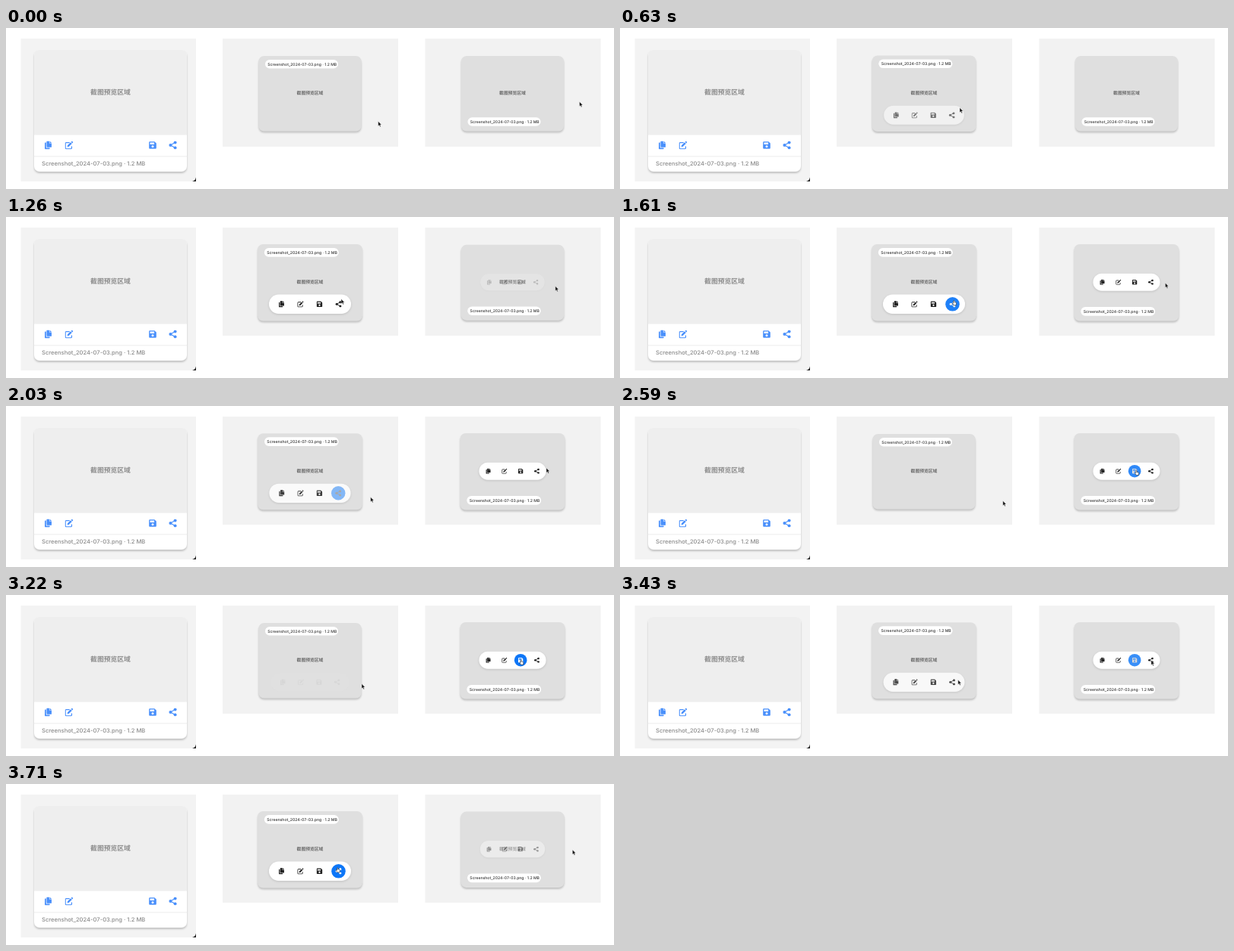
Recreate the animation shown at these times as an HTML page. Size 800 px wide and 213 px high, loop 3780 ms.

```html
<!DOCTYPE html>
<html lang="zh">
<head>
<meta charset="utf-8">
<style>
html, body { margin: 0; width: 100%; height: 100%; overflow: hidden; background: #fff; }
svg { display: block; width: 800px; height: 213px; }
text { font-family: Inter, "Noto Sans CJK SC", "Noto Sans CJK", sans-serif; font-weight: 500; text-rendering: geometricPrecision; }
.title { text-anchor: middle; font-weight: 700; }
.lift { filter: drop-shadow(0 2px 1.2px #0003); }
.soft { filter: drop-shadow(0 1px 1.5px #0002); }
</style>
</head>
<body>
<svg viewBox="0 0 800 213">
  <defs>
    <symbol id="copy" viewBox="0 0 16 16">
      <path fill="currentColor" d="M6 0h4v4.500h4.500V12H6q-1 0-1-1V1q0-1 1-1zM11 0l3.500 3.500H11zM2.500 3H4v10h7v2q0 1-1 1H2.500q-1 0-1-1V4q0-1 1-1z"/>
    </symbol>
    <symbol id="edit" viewBox="0 0 16 16">
      <path fill="none" stroke="currentColor" stroke-width="1.800" d="M9 3H2.500Q1 3 1 4.500v9Q1 15 2.500 15h9q1.500 0 1.500-1.500V10"/>
      <path fill="currentColor" d="M5 8.500l6-6L13.500 5l-6 6L4.500 11.500zM11.800 1.700l1-1q.7-.6 1.400 0l1.100 1.100q.6.7 0 1.400l-1 1z"/>
    </symbol>
    <symbol id="save" viewBox="0 0 16 16">
      <path fill="currentColor" fill-rule="evenodd" d="M2.500 1H11.500L15 4.500v9q0 1.500-1.500 1.500h-11Q1 15 1 13.500v-11Q1 1 2.500 1zM3 3v3.500h8V3zM8 8.500a2.200 2.200 0 1 0 .01 0z"/>
    </symbol>
    <symbol id="share" viewBox="0 0 16 16">
      <path fill="none" stroke="currentColor" stroke-width="1.800" d="M12.500 3l-9 5 9 5"/>
      <g fill="currentColor"><circle cx="12.500" cy="3" r="2.900"/><circle cx="3.500" cy="8" r="2.900"/><circle cx="12.500" cy="13" r="2.900"/></g>
    </symbol>
    <path id="arrow" fill="#111" stroke="#fff" stroke-width=".4" d="M0 0v6.300l1.400-1.300 1 2.300 1.100-.5-1-2.200h1.900z"/>
    <path id="hand" fill="#fff" stroke="#222" stroke-width=".6" stroke-linejoin="round" d="M-.6 3.600V.5q.6-1 1.200 0v1.700l2.100.5q.6.200.5 1L2.800 6.400H0L-1.800 4.200q.2-1 1.200-.6z"/>
  </defs>
</svg>
<script>
const LOOP = 3780, STEP = 70, FADE = 280, SAMPLES = 28;
const FILE = 'Screenshot_2024-07-03.png · 1.2 MB', TITLE = '截图预览区域';
const ICONS = ['copy', 'edit', 'save', 'share'];
const svg = document.querySelector('svg');

function add(parent, tag, attrs, text) {
  const el = document.createElementNS('http://www.w3.org/2000/svg', tag);
  for (const k in attrs) el.setAttribute(k, attrs[k]);
  if (text) el.textContent = text;
  parent.append(el);
  return el;
}
const rect = (p, x, y, width, height, rx, fill, cls = '') =>
  add(p, 'rect', { x, y, width, height, rx, fill, class: cls });
const icon = (p, name, x, y, s, color) =>
  add(p, 'use', { href: '#' + name, x: x - s / 2, y: y - s / 2, width: s, height: s, color });
const label = (p, x, y, size, fill) => add(p, 'text', { x, y, 'font-size': size, fill }, FILE);
const title = (p, x, y, size, fill) =>
  add(p, 'text', { x, y, 'font-size': size, fill, class: 'title' }, TITLE);

function staticCard() {
  rect(svg, 19.5, 14, 230.5, 189, 0, '#f3f3f3');
  rect(svg, 37, 29, 201, 161, 7, '#fff', 'lift');
  add(svg, 'path', { d: 'M37 141.500V36q0-7 7-7h187q7 0 7 7v105.500z', fill: '#eee' });
  rect(svg, 37, 169.5, 201, 0.8, 0, '#e8e8e8');
  title(svg, 137.5, 88.2, 8.8, '#8c8c8c');
  [55.5, 83, 193, 219.5].forEach((x, i) => icon(svg, ICONS[i], x, 155, 11, '#4a90fb'));
  label(svg, 47, 182.3, 7.6, '#8c8c8c');
  add(svg, 'path', { d: 'M250 197.500v5.500h-5q4-1 5-5.500z', fill: '#222' });
}

// Position on a polyline of [time, x, y] points.
function along(path, t) {
  const i = Math.max(1, path.findIndex(p => p[0] > t));
  const [t0, x0, y0] = path[i - 1], [t1, x1, y1] = path[i];
  const u = Math.max(0, (t - t0) / (t1 - t0));
  return [x0 + (x1 - x0) * u, y0 + (y1 - y0) * u];
}

// Fade level: share of the last FADE ms in which the test held.
function level(test, t) {
  let hits = 0;
  for (let k = 0; k < SAMPLES; k++) hits += test(t - k * FADE / SAMPLES);
  return hits / SAMPLES;
}

function hoverCard({ x, pillY, hot, bar, path }) {
  const mid = x + 115, hotX = bar.x + (hot - 1.5) * bar.gap;
  rect(svg, x, 14, 231, 143, 0, '#f2f2f2');
  const card = add(svg, 'g');
  rect(card, mid - 67.5, 37, 135, 99.5, 7, '#dfdfdf', 'lift');
  rect(card, x + 56, pillY, 96, 11.5, 5.75, '#fff');
  label(card, x + 59.3, pillY + 7.6, 5.07, '#333');
  title(svg, mid, 88.2, 5.8, '#666');

  const tools = add(svg, 'g');
  rect(tools, bar.x - bar.w / 2, bar.y - bar.h / 2, bar.w, bar.h, bar.h / 2, '#fff', 'soft');
  const disc = add(tools, 'circle', { cx: hotX, cy: bar.y, r: bar.r, fill: '#0d76f7' });
  const icons = ICONS.map((n, i) =>
    icon(tools, n, bar.x + (i - 1.5) * bar.gap, bar.y, bar.size, '#222'));
  const cursor = add(svg, 'use', {});

  const overCard = t => Math.abs(along(path, t)[0] - mid) <= 68;
  const overButton = t => {
    const [cx, cy] = along(path, t);
    return Math.hypot(cx - hotX, cy - bar.y) < 7;
  };
  const grow = (el, cx, cy, s) =>
    el.setAttribute('transform', `translate(${cx} ${cy}) scale(${s}) translate(${-cx} ${-cy})`);

  return t => {
    const show = level(overCard, t), glow = level(overButton, t);
    grow(card, mid, 87, 1 + 0.02 * show);
    grow(tools, bar.x, bar.y, 0.95 + 0.05 * show);
    tools.setAttribute('opacity', show);
    disc.setAttribute('opacity', glow);
    const c = Math.round(34 + 221 * glow);
    icons[hot].setAttribute('color', `rgb(${c},${c},${c})`);
    const [cx, cy] = along(path, t);
    cursor.setAttribute('href', overButton(t) ? '#hand' : '#arrow');
    cursor.setAttribute('transform', `translate(${cx} ${cy})`);
    cursor.setAttribute('visibility', cx < x + 231 ? 'visible' : 'hidden');
  };
}

staticCard();
const cards = [
  hoverCard({
    x: 285, pillY: 42, hot: 3,
    bar: { x: 400, y: 115.3, w: 108, h: 25.5, gap: 25, r: 9.3, size: 8.5 },
    path: [[0, 489.7, 123.5], [350, 485, 121], [630, 447, 105.5], [1260, 441, 108.5], [1900, 438, 112],
      [2030, 479.7, 120.5], [2590, 503.8, 125.5], [3220, 468, 117.5], [3500, 437, 110.5], [LOOP, 436, 110.5]]
  }),
  hoverCard({
    x: 551.5, pillY: 118.3, hot: 2,
    bar: { x: 666.5, y: 86.2, w: 88, h: 23, gap: 21.3, r: 8.3, size: 7.3 },
    path: [[0, 754.5, 97.5], [280, 756, 98], [350, 790, 102], [980, 790, 105], [1260, 722.8, 91.5],
      [2030, 711, 82], [2400, 680, 85], [3360, 677.3, 86], [3570, 742, 87], [LOOP, 747, 87]]
  })
];

function frame(now) {
  const t = Math.floor((now % LOOP) / STEP) * STEP;
  cards.forEach(draw => draw(t > 140 && t < 350 ? 140 : t));
  requestAnimationFrame(frame);
}
frame(0);
</script>
</body>
</html>
```
